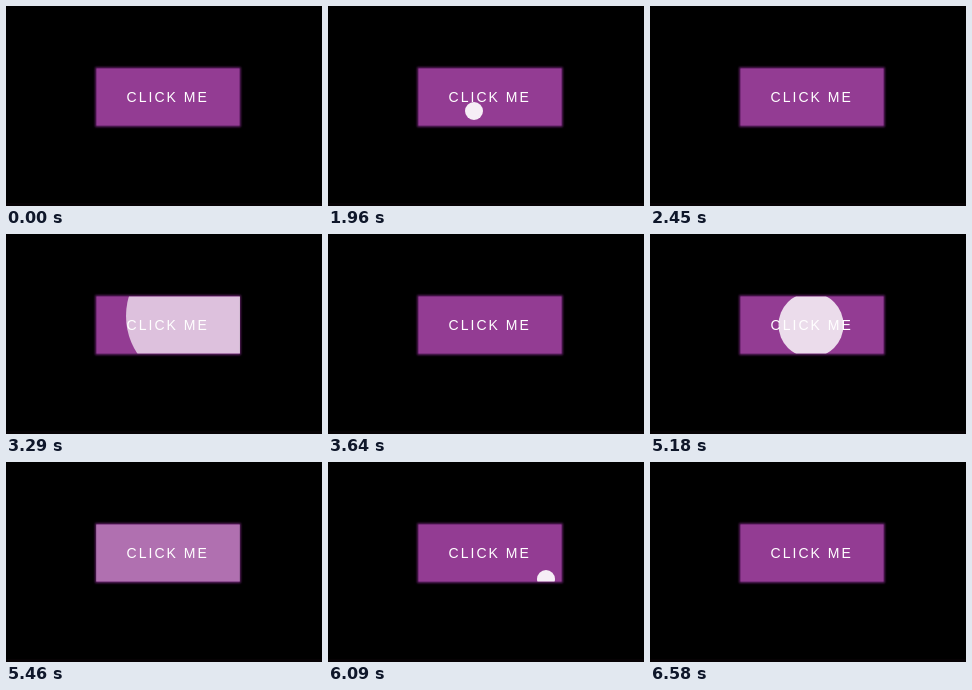
An HTML page for the animation above (6.72 s loop, 316 px wide and 200 px high).

```html
<!DOCTYPE html>
<html lang="en">
<head>
<meta charset="utf-8">
<title>Button ripple</title>
<style>
  html, body { margin: 0; width: 100%; height: 100%; overflow: hidden; background: #000; }
  svg { display: block; width: 100%; height: 100%; }
  text { font: 14px "Liberation Sans", Arial, sans-serif; letter-spacing: 2px; fill: #fff; }
</style>
</head>
<body>
<svg viewBox="0 0 316 200">
  <defs>
    <clipPath id="face"><rect x="90" y="62.5" width="144" height="57"/></clipPath>
    <filter id="soft"><feGaussianBlur stdDeviation="0.8"/></filter>
  </defs>
  <rect y="197" width="316" height="3" fill="#060204"/>
  <rect x="89.3" y="61.3" width="145.4" height="59.6" fill="#6b2470" filter="url(#soft)"/>
  <rect x="90.5" y="62.5" width="143" height="57" fill="#933c93"/>
  <text x="120.6" y="96">CLICK ME</text>
  <g clip-path="url(#face)"><circle id="ripple" fill="#fff"/></g>
</svg>
<script>
  const LOOP = 6720, DURATION = 480, MAX_RADIUS = 240, START_OPACITY = 0.95;
  const clicks = [
    { time: 1943, x: 146, y: 105 },
    { time: 3155, x: 188, y: 82 },
    { time: 4112, x: 128, y: 82 },
    { time: 5116, x: 161, y: 91 },
    { time: 6073, x: 218, y: 117 }
  ];
  const ripple = document.getElementById("ripple");

  function setAttributes(element, values) {
    for (const name in values) element.setAttribute(name, values[name]);
  }

  function draw(now) {
    const time = now % LOOP;
    const click = clicks.find(c => time >= c.time && time < c.time + DURATION);
    if (click) {
      const progress = (time - click.time) / DURATION;
      setAttributes(ripple, {
        cx: click.x,
        cy: click.y,
        r: MAX_RADIUS * progress,
        opacity: START_OPACITY * (1 - progress)
      });
    } else {
      setAttributes(ripple, { r: 0 });
    }
  }

  const start = performance.now();
  function tick() {
    draw(performance.now() - start);
    requestAnimationFrame(tick);
  }
  tick();
</script>
</body>
</html>
```
